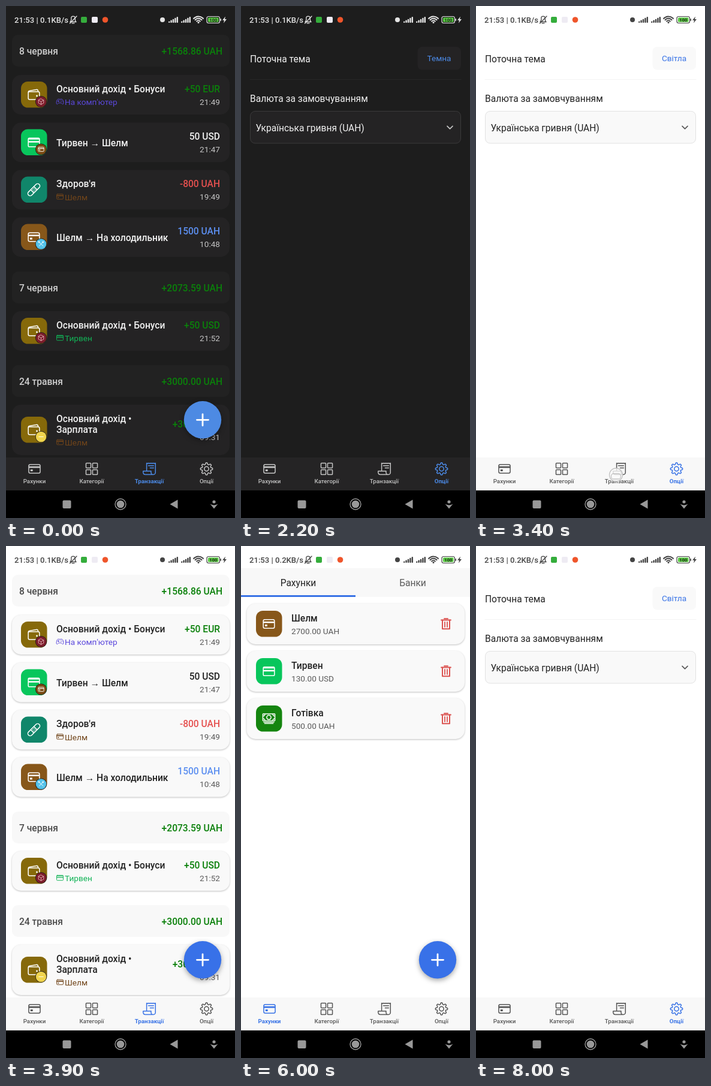
An HTML page with a canvas for the animation above (8.1 s loop, 382 px wide and 854 px high).

```html
<!DOCTYPE html>
<html lang="uk">
<head>
<meta charset="utf-8">
<style>
html, body { margin: 0; width: 100%; height: 100%; overflow: hidden; background: #000; }
canvas { display: block; width: 382px; height: 854px; }
</style>
</head>
<body>
<canvas id="stage"></canvas>
<script>
const W = 382, H = 854, LOOP = 8100;
const canvas = document.getElementById('stage');
const ctx = canvas.getContext('2d');
const dpr = window.devicePixelRatio || 1;
canvas.width = W * dpr;
canvas.height = H * dpr;

const FONT = 'Roboto, "Noto Sans", sans-serif';
const BODY = 15.57, SMALL = 13.62, TINY = 9.73;
const BANK_A = 'Шелм', BANK_B = 'Тирвен';

const themes = {
  dark: {
    bg: '#1d1d1d', card: '#242324', head: '#222222', bar: '#252425', edge: '#3b3a3b', line: '#272727',
    text: '#f1f1f1', dim: '#c4c4c4', day: '#cfcfcf', tab: '#c4c4c4', accent: '#4c8be8', fab: '#4d8ae3',
    status: '#e4e4e4', amount: '#f1f1f1', name: 'Темна'
  },
  light: {
    bg: '#ffffff', card: '#f9f9f9', head: '#f8f8f8', bar: '#f8f8f8', edge: '#e2e2e2', line: '#f3f3f3',
    text: '#222222', dim: '#5a5a5a', day: '#4a4a4a', tab: '#555555', accent: '#3973e6', fab: '#3871e8',
    status: '#444444', amount: '#222222', name: 'Світла', shadow: true
  }
};
const GOLD = '#86690a', BROWN = '#87571a', GREEN = '#08c65c', TEAL = '#10866a';
const INCOME = '#0a800a', SPEND = '#e5504f', MOVE = '#5c8ff0';

function text(str, x, cy, size, color, weight = 400, align = 'left') {
  ctx.font = `${weight} ${size}px ${FONT}`;
  ctx.textAlign = align;
  ctx.fillStyle = color;
  ctx.fillText(str, x, cy + size * 0.355);
}

function box(x, y, w, h, r, fill) {
  ctx.beginPath();
  ctx.roundRect(x, y, w, h, r);
  if (fill) { ctx.fillStyle = fill; ctx.fill(); }
}

function disc(x, y, r, fill) {
  ctx.beginPath();
  ctx.arc(x, y, r, 0, 7);
  ctx.fillStyle = fill;
  ctx.fill();
}

function line(points, color, width) {
  ctx.beginPath();
  points.forEach(([x, y], i) => i ? ctx.lineTo(x, y) : ctx.moveTo(x, y));
  ctx.strokeStyle = color;
  ctx.lineWidth = width;
  ctx.stroke();
}

function card(x, y, w, h, r, t, fill = t.card) {
  ctx.save();
  if (t.shadow) {
    ctx.shadowColor = 'rgba(0,0,0,.25)';
    ctx.shadowBlur = 3 * dpr;
    ctx.shadowOffsetY = dpr;
  }
  box(x, y, w, h, r, fill);
  ctx.restore();
}

function ring(n, fn) {
  return Array.from({ length: n }, (_, i) => fn(i)).join('L');
}

const gear = 'M' + ring(96, i => {
  const a = i / 96 * Math.PI * 2;
  const r = 192 + 30 * Math.tanh(2.2 * Math.cos(a * 8));
  return `${256 + r * Math.sin(a)} ${256 - r * Math.cos(a)}`;
}) + 'Z';

const round = (x, y, w, h, r) => `M${x + r} ${y}h${w - 2 * r}a${r} ${r} 0 0 1 ${r} ${r}v${h - 2 * r}` +
  `a${r} ${r} 0 0 1-${r} ${r}h${2 * r - w}a${r} ${r} 0 0 1-${r}-${r}v${2 * r - h}a${r} ${r} 0 0 1 ${r}-${r}z`;
const dot = (x, y, r) => `M${x - r} ${y}a${r} ${r} 0 1 0 ${2 * r} 0a${r} ${r} 0 1 0-${2 * r} 0z`;

// Icons live in a 512 unit square: stroked part, filled part, rotation.
const icons = {
  wallet: [round(48, 144, 416, 288, 48) + 'M411 144v-30a50 50 0 0 0-59-49L89 110a50 50 0 0 0-41 49v49', dot(368, 300, 32)],
  card: [round(48, 96, 416, 320, 56), 'M48 165h416v60H48zM110 280h85v65h-85z'],
  strip: [round(48, 96, 416, 320, 40), 'M48 110h416v40H48zM48 205h416v55H48z'],
  bandage: [round(-24, 172, 560, 168, 83) + 'M172 172v168M340 172v168',
    dot(225, 225, 18) + dot(287, 225, 18) + dot(225, 287, 18) + dot(287, 287, 18), -Math.PI / 4],
  pad: ['M468 249C449 166 422 113 378 100C335 88 304 112 256 112S177 88 133 100C89 113 62 166 43 249' +
    'C24 334 28 401 65 414C91 423 114 404 136 377C161 346 192 336 256 336S350 346 375 377C397 404 421 423 446 414C487 400 487 335 468 249z' +
    'M160 176v96M208 224h-96', dot(292, 224, 20) + dot(336, 268, 20) + dot(336, 180, 20) + dot(380, 224, 20)],
  grid: [[48, 288].map(x => round(x, 48, 176, 176, 20) + round(x, 288, 176, 176, 20)).join('')],
  receipt: ['M160 336V48l32 16 32-16 32 16 32-16 32 16 32-16 32 16 32-16 32 16 32-16v336a80 80 0 0 1-160 0v-48H48' +
    'a16 16 0 0 0-16 16c0 64 7 112 80 112h288M224 144h192M288 224h128'],
  gear: [gear + dot(256, 256, 80)],
  cash: [round(32, 80, 448, 256, 16) + dot(256, 208, 80) + 'M64 384h384M96 432h320' +
    'M480 160a80 80 0 0 1-80-80M32 160a80 80 0 0 0 80-80M480 256a80 80 0 0 0-80 80M32 256a80 80 0 0 1 80 80'],
  plane: ['', 'M408 224L325 226 194 68Q190 65 187 65H160l74 164-125 2q-4 0-7-3l-37-45q-5-6-13-6H32l21 79-21 80h20' +
    'q9 0 13-6l38-46q3-3 7-3l124 3-74 163h27q4 0 6-3L323 287l85 1C452 288 480 276 480 256S452 224 408 224z', -Math.PI / 2],
  food: ['M90 90L420 430M95 425L340 175', 'M70 70Q80 50 110 70L290 260 240 305Q90 190 70 70z' +
    'M300 170L400 60 425 85 355 165 370 180 440 100 465 125 355 235Q320 240 295 215z'],
  cube: ['M256 48L448 150V362L256 464 64 362V150zM64 150l192 106 192-106M256 256v208'],
  tools: ['M100 100L410 410M110 410L400 110', dot(100, 100, 55) + dot(400, 110, 55)],
  minus: ['M90 256h332']
};
for (const k in icons) {
  const [s, f, turn] = icons[k];
  icons[k] = { stroke: new Path2D(s), fill: f && new Path2D(f), turn: turn || 0 };
}

function icon(name, cx, cy, size, color, width = 34) {
  const { stroke, fill, turn } = icons[name];
  ctx.save();
  ctx.translate(cx, cy);
  ctx.rotate(turn);
  ctx.scale(size / 512, size / 512);
  ctx.translate(-256, -256);
  ctx.lineWidth = width;
  ctx.strokeStyle = ctx.fillStyle = color;
  ctx.stroke(stroke);
  if (fill) ctx.fill(fill);
  ctx.restore();
}

function tile(name, cy, color) {
  box(25, cy - 22, 43.5, 43.5, 11.5, color);
  icon(name, 46.5, cy, 23, '#fff');
}

function badge(name, cy, color, ink) {
  disc(58.5, cy, 9.6, '#1a1a1a');
  disc(58.5, cy, 8.8, color);
  icon(name, 58.5, cy, 11.5, ink, 40);
}

function statusBar(t, speed) {
  const c = t.status;
  text(`21:53 | ${speed}KB/s`, 14, 23.5, 13.1, c, 500);
  ctx.beginPath();
  ctx.moveTo(107, 26.5);
  ctx.quadraticCurveTo(109, 25, 109, 21);
  ctx.arc(112, 20.5, 3.3, Math.PI, 0);
  ctx.quadraticCurveTo(115, 25, 117, 26.5);
  ctx.closePath();
  ctx.strokeStyle = c;
  ctx.lineWidth = 1.3;
  ctx.stroke();
  line([[110, 28.8], [114, 28.8]], c, 1.3);
  line([[106.5, 29], [118, 17]], c, 1.3);
  box(125, 18, 10, 10, 2, '#35ad3c');
  box(143, 18, 10, 10, 2, '#eeebf3');
  disc(165.5, 23, 4.8, '#ef552b');
  disc(261, 23, 4, c);
  for (const x of [271, 292]) {
    for (let i = 0; i < 5; i++) {
      const h = 2.5 + i * 1.9;
      box(x + i * 3.4, 28 - h, 2.4, h, 1, c);
    }
  }
  for (const r of [3.8, 7.2, 10.6]) {
    ctx.beginPath();
    ctx.arc(321, 28, r, -Math.PI * 0.77, -Math.PI * 0.23);
    ctx.strokeStyle = c;
    ctx.lineWidth = 2;
    ctx.stroke();
  }
  disc(321, 27.5, 1.5, c);
  box(335, 17.5, 21.5, 11, 3);
  ctx.strokeStyle = c;
  ctx.lineWidth = 1.2;
  ctx.stroke();
  box(337, 19.3, 17.5, 7.4, 1.5, '#58c842');
  text('100', 345.8, 23.2, 7.5, '#1c2b18', 700, 'center');
  box(357.4, 21, 1.6, 4, 0.8, c);
  ctx.fillStyle = c;
  ctx.fill(new Path2D('M366 17.5L361 23.8H364L363 28.5 368 22H365z'));
}

function tabBar(t, active) {
  box(0, 753, W, 55, 0, t.bar);
  [['card', 'Рахунки', 47.5], ['grid', 'Категорії', 143], ['receipt', 'Транзакції', 239], ['gear', 'Опції', 334.5]]
    .forEach(([name, label, x], i) => {
      const c = i === active ? t.accent : t.tab;
      icon(name, x, 772, 23.5, c, 33);
      text(label, x, 792.5, TINY, c, i === active ? 700 : 500, 'center');
    });
}

function systemBar() {
  const c = '#999';
  box(0, 808, W, 46, 0, '#000');
  box(94.5, 824.5, 14, 13.5, 2, c);
  disc(191, 831, 6.3, c);
  ctx.beginPath();
  ctx.arc(191, 831, 9, 0, 7);
  ctx.strokeStyle = c;
  ctx.lineWidth = 1.4;
  ctx.stroke();
  ctx.fillStyle = c;
  ctx.fill(new Path2D('M286.5 823.5V838.5L273.5 831zM340.5 830.5Q347 834.5 353.5 830.5L347 838.5z'));
  disc(347, 827, 2.6, c);
}

function addButton(t) {
  ctx.save();
  ctx.shadowColor = 'rgba(0,0,0,.35)';
  ctx.shadowBlur = 8 * dpr;
  ctx.shadowOffsetY = 3 * dpr;
  disc(328, 690.3, 31.2, t.fab);
  ctx.restore();
  line([[318.5, 690.3], [337.5, 690.3]], '#fff', 2.8);
  line([[328, 680.8], [328, 699.8]], '#fff', 2.8);
}

function trash(cy) {
  const c = '#db5350';
  line([[334, cy - 6.5], [350, cy - 6.5]], c, 1.9);
  line([[339, cy - 8.7], [345, cy - 8.7]], c, 1.9);
  line([[336, cy - 6.5], [336, cy + 8.2], [348, cy + 8.2], [348, cy - 6.5]], c, 2);
  line([[340, cy - 3], [340, cy + 5]], c, 1.8);
  line([[344, cy - 3], [344, cy + 5]], c, 1.8);
}

function segments(t, on, off) {
  box(0, 37, W, 48, 0, t.bar);
  text(on, 95.5, 61.5, BODY, t.text, 400, 'center');
  text(off, 286.5, 61.5, BODY, t.dim, 400, 'center');
  box(0, 82, 191, 3, 0, t.accent);
}

function listPage(t, rows) {
  rows.forEach(([name, color, title, sum], i) => {
    const cy = 130 + i * 79;
    card(9.5, cy - 34, 363.5, 68, 15, t);
    tile(name, cy, color);
    if (sum) {
      text(title, 84, cy - 9.5, BODY, t.text, 500);
      text(sum, 84, cy + 12.5, SMALL, t.dim);
    } else {
      text(title, 84, cy + 1, BODY, t.text);
    }
    trash(cy);
  });
  addButton(t);
}

function accounts(t) {
  segments(t, 'Рахунки', 'Банки');
  listPage(t, [
    ['card', BROWN, BANK_A, '2700.00 UAH'],
    ['strip', GREEN, BANK_B, '130.00 USD'],
    ['cash', '#15850f', 'Готівка', '500.00 UAH']
  ]);
}

function categories(t) {
  segments(t, 'Витрати', 'Надходження');
  listPage(t, [
    ['food', '#ee4b8b', 'Продукти та їжа'],
    ['plane', '#3797fb', 'Транспорт'],
    ['bandage', TEAL, "Здоров'я"],
    ['pad', '#a139fb', 'Розваги']
  ]);
}

const days = [[48, '8 червня', '+1568.86 UAH'], [443, '7 червня', '+2073.59 UAH'], [599, '24 травня', '+3000.00 UAH']];
const incomeBadge = ['cube', '#7d1d2b', '#e9b5bb'];
const brownSub = ['card', BANK_A, '#71451a'];
const entries = [
  { y: 115, tile: ['wallet', GOLD], badge: incomeBadge, title: ['Основний дохід • Бонуси'],
    sub: ['pad', "На комп'ютер", '#5b48dc'], sum: '+50 EUR', color: INCOME, time: '21:49' },
  { y: 194.5, tile: ['strip', GREEN], badge: ['card', '#7a4b14', '#fff'], title: [`${BANK_B} → ${BANK_A}`],
    sum: '50 USD', time: '21:47' },
  { y: 273.5, tile: ['bandage', TEAL], title: ["Здоров'я"], sub: brownSub, sum: '-800 UAH', color: SPEND, time: '19:49' },
  { y: 352.5, tile: ['card', BROWN], badge: ['tools', '#55c3ea', '#fff'], title: [`${BANK_A} → На холодильник`],
    sum: '1500 UAH', color: MOVE, time: '10:48' },
  { y: 509, tile: ['wallet', GOLD], badge: incomeBadge, title: ['Основний дохід • Бонуси'],
    sub: ['strip', BANK_B, '#12b457'], sum: '+50 USD', color: INCOME, time: '21:52' },
  { y: 665, h: 84, tile: ['wallet', GOLD], badge: ['minus', '#f0d44d', '#fff'], title: ['Основний дохід •', 'Зарплата'],
    sub: brownSub, sum: '+3000 UAH', color: INCOME, time: '09:31' }
];

function transactions(t) {
  for (const [y, day, total] of days) {
    box(10, y, 363, 53, 10, t.head);
    text(day, 22, y + 27, BODY, t.day, 500);
    text(total, 361, y + 27, BODY, INCOME, 500, 'right');
  }
  for (const e of entries) {
    const h = e.h || 66, mid = e.y + h / 2;
    card(10, e.y, 363, h, 15, t);
    tile(e.tile[0], mid, e.tile[1]);
    if (e.badge) badge(e.badge[0], mid + 11.5, e.badge[1], e.badge[2]);
    const top = e.sub ? mid - 1 - 9 * e.title.length : mid + 1;
    e.title.forEach((s, i) => text(s, 84, top + i * 18, BODY, t.text, 500));
    if (e.sub) {
      const y = top + e.title.length * 18 + 4;
      icon(e.sub[0], 90, y - 0.5, 13.5, e.sub[2], 36);
      text(e.sub[1], 98, y + 0.5, SMALL, e.sub[2]);
    }
    text(e.sum, 357, mid - 10, BODY, e.color || t.amount, 500, 'right');
    text(e.time, 357, mid + 12, SMALL, t.dim, 400, 'right');
  }
  addButton(t);
}

function options(t) {
  text('Поточна тема', 15, 88, BODY, t.text);
  box(294.5, 68, 72.5, 38.5, 8, t.card);
  text(t.name, 330.5, 87.5, SMALL, t.accent, 400, 'center');
  line([[15, 122.5], [367, 122.5]], t.line, 1);
  text('Валюта за замовчуванням', 15, 154, BODY, t.text);
  box(15.5, 175.5, 351, 53.5, 8, t.card);
  ctx.strokeStyle = t.edge;
  ctx.lineWidth = 1;
  ctx.stroke();
  text('Українська гривня (UAH)', 24.5, 203.5, BODY, t.text);
  line([[344, 200.3], [348.5, 204.8], [353, 200.3]], t.dim, 1.7);
}

function touch(x, y) {
  disc(x, y, 11, 'rgba(250,250,250,.8)');
  ctx.strokeStyle = '#c4c4c4';
  ctx.lineWidth = 1.3;
  ctx.stroke();
  box(x - 8, y - 2, 16, 9, 4);
  ctx.stroke();
}

// Start time, page, active tab, theme.
const scenes = [
  [0, transactions, 2, 'dark'],
  [400, options, 3, 'dark'],
  [2300, options, 3, 'light'],
  [3500, transactions, 2, 'light'],
  [4300, categories, 1, 'light'],
  [5000, accounts, 0, 'light'],
  [6400, options, 3, 'light']
];

function draw(ms) {
  const [, page, tab, mode] = scenes.findLast(s => s[0] <= ms);
  const t = themes[mode];
  ctx.setTransform(dpr, 0, 0, dpr, 0, 0);
  ctx.lineCap = ctx.lineJoin = 'round';
  box(0, 0, W, H, 0, t.bg);
  page(t);
  tabBar(t, tab);
  if (ms >= 3400 && ms < 3500) touch(233.5, 782);
  statusBar(t, ms < 4800 ? '0.1' : '0.2');
  systemBar();
}

const start = performance.now();
function tick() {
  draw((performance.now() - start) % LOOP);
  requestAnimationFrame(tick);
}
tick();
</script>
</body>
</html>
```
